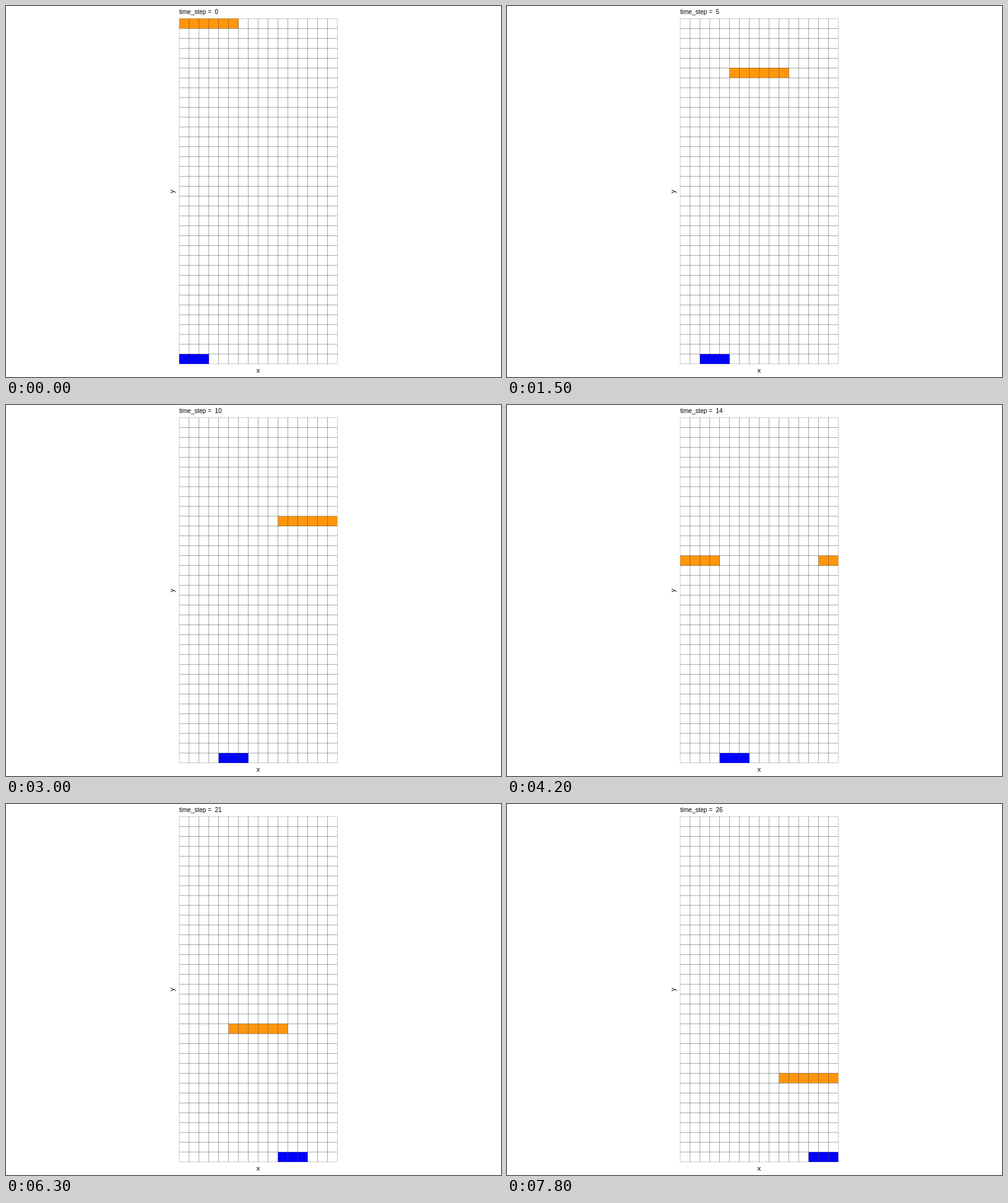
An HTML page that plays this animation: 800x600 px, repeating every 8 s.

```html
<!DOCTYPE html>
<html lang="en">
<head>
<meta charset="utf-8">
<title>Grid steps</title>
<style>
  html, body { margin: 0; width: 100%; height: 100%; overflow: hidden; background: #fff; }
  svg { display: block; width: 800px; height: 600px; }
  text { font-family: "Liberation Sans", Arial, Helvetica, sans-serif; fill: #000; white-space: pre; }
</style>
</head>
<body>
<svg viewBox="0 0 800 600">
  <g id="cells"></g>
  <g id="lines" fill="#000"></g>
  <text id="title" x="280" y="13.3" font-size="10"></text>
  <text x="407.6" y="593" font-size="11" text-anchor="middle">x</text>
  <text transform="translate(272 300) rotate(-90)" font-size="11" text-anchor="middle">y</text>
</svg>
<script>
const COLS = 16, ROWS = 35, CELL = 15.96;
const LEFT = 280, TOP = 20.33;
const LINE = 0.34, BORDER = 0.2;
const STEP_MS = 300, LOOP_MS = 8000;
const BALL_WIDTH = 6, PADDLE_WIDTH = 3;
// Paddle column at key steps: [step, column]
const PADDLE_PATH = [[0, 0], [5, 2], [10, 4], [14, 4], [18, 8], [21, 10], [26, 13]];

const byId = id => document.getElementById(id);
const colX = c => LEFT + c * CELL;
const rowY = r => TOP + r * CELL;

function setAttrs(node, attrs) {
  for (const key in attrs) node.setAttribute(key, attrs[key]);
  return node;
}

function addRect(parent, attrs) {
  const rect = document.createElementNS("http://www.w3.org/2000/svg", "rect");
  parent.append(rect);
  return setAttrs(rect, attrs);
}

function drawGrid() {
  const lines = byId("lines");
  const weight = (i, last) => i === 0 || i === last ? BORDER : LINE;
  for (let c = 0; c <= COLS; c++) {
    const width = weight(c, COLS);
    addRect(lines, { x: colX(c) - width / 2, y: TOP, width, height: ROWS * CELL });
  }
  for (let r = 0; r <= ROWS; r++) {
    const height = weight(r, ROWS);
    addRect(lines, { x: LEFT, y: rowY(r) - height / 2, width: COLS * CELL, height });
  }
}

const makeCells = (count, fill) =>
  Array.from({ length: count }, () =>
    addRect(byId("cells"), { width: CELL, height: CELL, fill }));

function placeCells(cells, col, row) {
  cells.forEach((cell, i) =>
    setAttrs(cell, { x: colX((col + i) % COLS), y: rowY(row) }));
}

function paddleCol(step) {
  const i = PADDLE_PATH.findIndex(([s]) => s >= step);
  if (i === 0) return 0;
  const [s0, c0] = PADDLE_PATH[i - 1], [s1, c1] = PADDLE_PATH[i];
  return Math.round(c0 + (c1 - c0) * (step - s0) / (s1 - s0));
}

drawGrid();
const ball = makeCells(BALL_WIDTH, "#ff960c");
const paddle = makeCells(PADDLE_WIDTH, "#0000ff");

function render(time) {
  const step = Math.floor((time % LOOP_MS) / STEP_MS);
  placeCells(ball, step % COLS, step);
  placeCells(paddle, paddleCol(step), ROWS - 1);
  byId("title").textContent = "time_step =  " + step;
}

const start = performance.now();
function tick() {
  render(performance.now() - start);
  requestAnimationFrame(tick);
}
tick();
</script>
</body>
</html>
```
